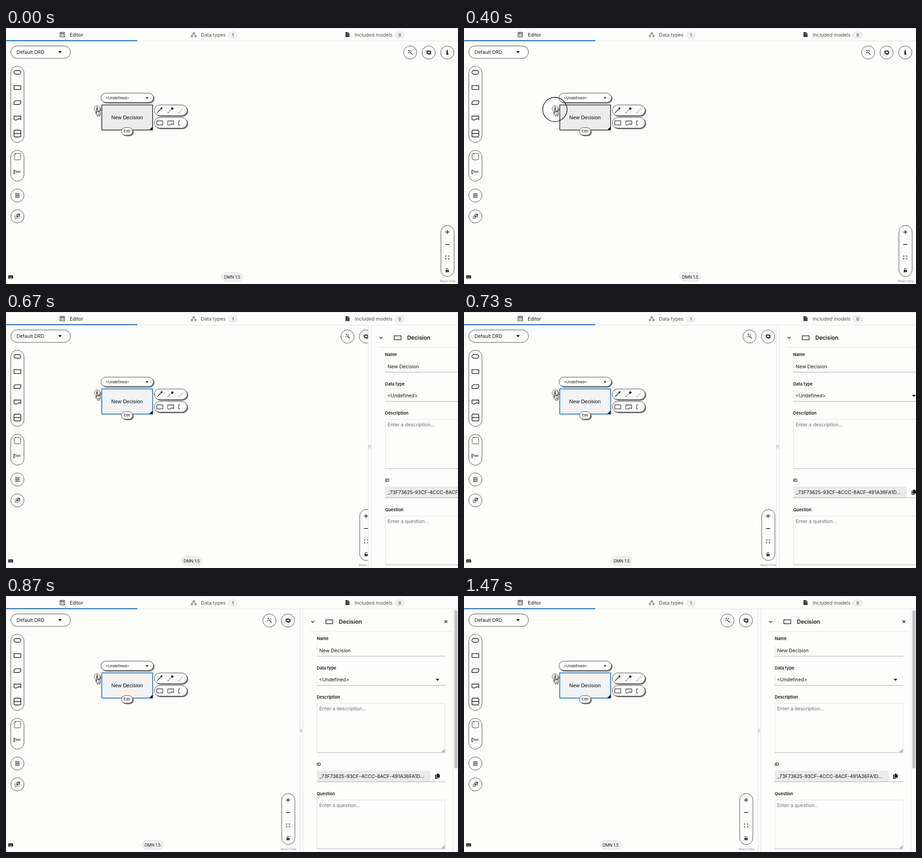
Recreate the animation shown at these times as an HTML page. Size 992 by 564 pixels, loop 1540 ms.

```html
<!DOCTYPE html>
<html lang="en">
<head>
<meta charset="utf-8">
<title>Decision editor</title>
<style>
  html, body { margin: 0; width: 100%; height: 100%; overflow: hidden; background: #fff; }
  svg { display: block; width: 100%; height: 100%; }
  text { font: 10.6px Inter, "Open Sans", sans-serif; fill: #151515; }
  .muted { fill: #4d4d4d; }
  .hint { fill: #6a6e73; }
  .small { font-size: 9px; }
  .label { font-size: 9.2px; font-weight: 600; }
  .mid { text-anchor: middle; }
  .pill { fill: #fdfdfc; stroke: #333; stroke-width: .9; }
  .badge { fill: #f0f0f0; stroke: #d5d5d9; stroke-width: .8; }
  .float { filter: drop-shadow(2px 2px .7px #777); }
  .icon { fill: none; stroke: #151515; stroke-width: 1.35; }
  .thin { stroke-width: 1; }
  .solid { fill: #151515; }
  .rule { fill: none; stroke: #e0e0ec; }
  .field { fill: none; stroke: #9a9ca6; stroke-width: .9; }
  #node rect { fill: #ececec; stroke: #111; stroke-width: 1.4; }
  #node.selected rect { fill: #f1f3f5; stroke: #1264ac; filter: drop-shadow(0 0 1.5px #8dbbe2); }
</style>
</head>
<body>
<svg viewBox="0 0 992 564">
  <defs>
    <pattern id="dots" width="14.4" height="14.4" patternUnits="userSpaceOnUse">
      <circle cx="12.5" cy="12.5" r=".5" fill="#dcdce6"/>
    </pattern>
    <path id="caret" class="solid" d="M-4-2H4L0 2.4Z"/>
    <path id="doc" d="M-7.5-4H7.5V3.5Q3.5 1 0 3.5T-7.5 3.5Z"/>
    <path id="grip" class="icon thin" d="M0 0l-6 6M0 3.5l-2.5 2.5"/>
    <g id="letter-i" class="solid"><path d="M-2.6-1.5H1.4V3H2.8V5H-2.8V3H-1.2V.5H-2.6Z"/><circle cy="-3.6" r="1.6"/></g>
  </defs>
  <rect width="992" height="564" fill="#fdfdfb"/>
  <rect y="29" width="992" height="535" fill="url(#dots)"/>

  <!-- tabs -->
  <rect width="992" height="28" fill="#fdfdfb"/>
  <path class="rule" d="M0 .5H992M0 28.5H992"/>
  <rect y="27" width="288" height="2" fill="#1264ac"/>
  <g class="icon" style="stroke-width:1">
    <path d="M118.5 9.5h10v10h-10zM120.5 11.5h2v2h-2zM124.5 11.5h2v2h-2zM120.5 16.5h2.5M124.500 16.5h2.500"/>
    <path style="stroke:#4d4d4d" d="M410.5 10h3v3h-3zM406.5 16.5h3v3h-3zM414.5 16.5h3v3h-3zM411 13l-3 3.5M413 13l3 3.5"/>
  </g>
  <path fill="#444" d="M745 9h5.5v3.5h3.5V20h-9zM751 9l3 3h-3z"/>
  <text x="140" y="19">Editor</text>
  <text class="muted" x="428" y="19">Data types</text>
  <text class="muted" x="765.5" y="19">Included models</text>
  <rect class="badge" x="488.5" y="8.5" width="19" height="14" rx="7"/>
  <rect class="badge" x="853.5" y="8.5" width="21" height="14" rx="7"/>
  <text class="small mid" x="498" y="19">1</text>
  <text class="small mid" x="864" y="19">0</text>

  <!-- left controls -->
  <rect class="pill" x="10.5" y="39.5" width="131" height="27.5" rx="13.75"/>
  <text x="23" y="57">Default DRD</text>
  <use href="#caret" x="118.5" y="53"/>
  <rect class="pill" x="10.5" y="84" width="29" height="168" rx="14.5"/>
  <rect class="pill" x="10.5" y="269.5" width="29" height="68" rx="14.5"/>
  <circle class="pill" cx="25" cy="369" r="14.5"/>
  <circle class="pill" cx="25" cy="415" r="14.5"/>
  <g class="icon">
    <rect x="17.5" y="93.7" width="15" height="8" rx="4"/>
    <rect x="17.5" y="127" width="15" height="8.5"/>
    <path d="M20.5 160.3H32.5V165.5L29.5 168.5H17.5V163.3Z" stroke-linejoin="round"/>
    <use href="#doc" x="25" y="198"/>
    <rect x="17.5" y="225" width="15" height="15" rx="3"/>
    <path d="M17.5 232.5h15M20 365.5h10M20 369h10M20 372.5h10"/>
    <rect x="18" y="276.5" width="14" height="14" rx="3" stroke-dasharray="2.6 1.8"/>
    <path d="M19 313h-1.5v8H19"/>
    <path class="thin" d="M24 410h6v6h-6zM25 415l4-4M26.5 411H29v2.5"/>
    <path class="thin" d="M20 414h6v6h-6z" stroke-dasharray="1.5 1"/>
    <path class="thin" d="M21 419l4-4"/>
  </g>
  <text x="19" y="319.3" style="font-size:6px;font-weight:600">Text</text>
  <rect class="solid" x="5" y="545" width="10.5" height="7" rx="1"/>
  <path d="M6.5 547h7.5M6.5 548.7h7.5" stroke="#fff" stroke-width=".8" stroke-dasharray="1 .8"/>
  <path d="M7.5 550.5h5.5" stroke="#fff" stroke-width=".8"/>

  <!-- decision node -->
  <g id="node">
    <rect x="210.3" y="169.5" width="111.4" height="55.2"/>
    <path class="solid" d="M322 217V225H314Z"/>
    <text class="mid" x="265.5" y="201" style="font:11.3px 'Liberation Sans',Arial,sans-serif;fill:#000">New Decision</text>
  </g>
  <g class="float">
    <rect class="pill" x="208.5" y="143.5" width="115" height="20.5" rx="10.25"/>
    <rect class="pill" x="325.5" y="169.5" width="72" height="23.5" rx="11.75"/>
    <rect class="pill" x="325.5" y="197" width="72" height="23.5" rx="11.75"/>
    <rect class="pill" x="253.5" y="219.5" width="24.5" height="16.5" rx="8.25"/>
    <circle class="pill" cx="200" cy="178" r="6.5"/>
  </g>
  <text x="219" y="157" style="font-size:8.2px">&lt;Undefined&gt;</text>
  <use href="#caret" transform="translate(309.5 154) scale(.8)"/>
  <text class="mid" x="265.5" y="230.3" style="font-size:8px">Edit</text>
  <use href="#letter-i" transform="translate(200 178) scale(.75)"/>
  <g class="icon" style="stroke-width:1.1">
    <path d="M331.5 187L341 177"/>
    <path d="M355 187l9-9" stroke-dasharray="3 2"/>
    <path d="M379 187l10-10" stroke-dasharray="1.7 3"/>
    <rect x="331" y="204.5" width="13" height="9"/>
    <use href="#doc" transform="translate(361.5 209) scale(.88 1.05)"/>
    <path d="M382 204.5h-3v9h3"/>
  </g>
  <path class="solid" d="M343.5 174.5l-1.5 5-3.5-3.5z"/>
  <circle class="solid" cx="365" cy="177.5" r="2.5"/>

  <!-- bottom and right controls -->
  <g id="version">
    <rect class="badge" x="473.5" y="538.5" width="46" height="19.5" rx="9.75"/>
    <text class="small mid" x="496.5" y="551.7">DMN 1.5</text>
  </g>
  <g id="right">
    <g id="tools">
      <circle class="pill" cx="887" cy="54" r="14.5"/>
      <circle class="pill" cx="927.5" cy="54" r="14.5"/>
      <path class="icon" stroke-linecap="round" d="M886 52.5l5.5 5.5"/>
      <path class="icon thin" d="M884.5 48v3M883 49.5h3M888.5 49v2M882.5 53.5h2M889 52l1.5-1.5M883 56l1.5-1.5"/>
      <rect class="icon thin" x="923" y="50" width="8" height="6" rx="1"/>
      <rect class="icon" x="924.8" y="51.5" width="7.5" height="5" fill="#fff"/>
      <path class="icon" d="M926.5 58.3h4.5"/>
    </g>
    <g id="info">
      <circle class="pill" cx="968.5" cy="54" r="14.5"/>
      <use href="#letter-i" x="968.5" y="53.5"/>
    </g>
    <rect class="pill" x="954.5" y="435" width="29" height="112.5" rx="14.5"/>
    <path class="icon" d="M964 449.5h9M968.5 445v9M964 477h9"/>
    <path class="icon" style="stroke-width:1.2" d="M964.8 504v-2h2M970.2 502h2v2M972.2 507v2h-2M966.8 509h-2v-2"/>
    <rect class="solid" x="965.2" y="533" width="6.6" height="5" rx=".7"/>
    <path class="icon" style="stroke-width:1.1" d="M966.5 533v-1.5a2 2 0 0 1 4 0"/>
    <circle cx="968.5" cy="535.5" r=".9" fill="#fff"/>
    <text class="mid" x="969.5" y="560" style="font-size:6.7px;fill:#8d8d95">React Flow</text>
  </g>

  <!-- properties drawer, placed at its open position -->
  <g id="drawer">
    <rect x="644.5" y="29" width="348" height="535" fill="#fdfdfb"/>
    <path class="rule" d="M645 29V564M651.5 29V564M668 78H977M981 29V564"/>
    <path d="M646.3 292.5v8M649 292.5v8" stroke="#a5a5ad" stroke-width="1"/>
    <path class="icon" d="M670 55l3.2 3.2L676.4 55"/>
    <rect class="icon" x="702" y="52.5" width="15" height="8.5"/>
    <text x="730.5" y="61" style="font-size:12.1px;font-weight:600">Decision</text>
    <path class="icon" d="M962.5 53.5l6 6M968.5 53.5l-6 6"/>
    <text class="label" x="682" y="97">Name</text>
    <text class="label" x="682" y="161.5">Data type</text>
    <text class="label" x="682" y="226">Description</text>
    <text class="label" x="682" y="374">ID</text>
    <text class="label" x="682" y="438.5">Question</text>
    <rect x="682" y="384.5" width="249" height="24.5" fill="#ebebeb"/>
    <text x="687.5" y="123.8">New Decision</text>
    <text x="687" y="188">&lt;Undefined&gt;</text>
    <text class="hint" x="687.5" y="252">Enter a description...</text>
    <text x="687.5" y="400.8">_73F73625-93CF-4CCC-8ACF-491A36FA1D...</text>
    <text class="hint" x="687.5" y="465">Enter a question...</text>
    <use href="#caret" x="947" y="184.5"/>
    <path class="rule" d="M682.5 108V132M682.5 172V197M682.5 345V236.5H963.5V345M682.5 557V449.5H963.5V557"/>
    <path class="field" d="M682 132.5H964M682 197H964M682 345H964M682 409.3H964M682 557H964"/>
    <use href="#grip" x="963" y="338"/>
    <use href="#grip" x="963" y="550"/>
    <path class="solid" d="M945 391.5h4l3 3v5.5h-7zM942 393.5h2v7.5h5v1.5h-7z"/>
    <rect x="984" y="31" width="7" height="349" rx="3.5" fill="#c1c1c1"/>
  </g>

  <circle id="ring" cx="199.5" cy="179.5" r="26.7" fill="none" stroke="#111" stroke-width="1.4"/>
  <path d="M199 188.5V180.5q0-1.5 1.2-1.5t1.3 1.5V185q1-.8 2 .2 1-.5 1.8.4 1.7-.2 1.7 1.6v2.3q0 1.5-1 2.7v1.8h-5.5v-1.5l-4-4.5q-.8-1.5.4-1.9 1-.2 2.1 1.4z"
    fill="#fff" stroke="#111" stroke-width="1" stroke-linejoin="round"/>
  <path d="M201.8 188.5v3M203.5 188.5v3M205.2 188.5v3" stroke="#111" stroke-width=".7"/>
</svg>
<script>
const LOOP = 1540, PRESS = 335, RELEASE = 505, OPEN = 598, SLIDE = 223, LAYOUT_LAG = 6.5;
const part = id => document.getElementById(id);
const shift = (id, x) => part(id).setAttribute('transform', `translate(${x} 0)`);
const show = (id, on) => part(id).style.display = on ? '' : 'none';

// CSS "ease": cubic-bezier(.25, .1, .25, 1)
function ease(x) {
  if (x <= 0) return 0;
  if (x >= 1) return 1;
  const curve = (a, b, u) => 3 * a * u * (1 - u) ** 2 + 3 * b * u * u * (1 - u) + u ** 3;
  let low = 0, high = 1;
  for (let i = 0; i < 24; i++) {
    const mid = (low + high) / 2;
    if (curve(.25, .25, mid) < x) low = mid; else high = mid;
  }
  return curve(.1, 1, low);
}

function draw() {
  const t = performance.now() % LOOP;
  const open = t >= OPEN;
  const canvasShift = -349.5 * ease((t - OPEN - LAYOUT_LAG) / SLIDE);
  show('ring', t >= PRESS && t < RELEASE);
  show('drawer', open);
  show('info', !open);
  part('node').classList.toggle('selected', open);
  shift('drawer', 345 * (1 - ease((t - OPEN) / SLIDE)));
  shift('tools', open ? 40.7 : 0);
  shift('right', canvasShift);
  shift('version', canvasShift / 2);
  requestAnimationFrame(draw);
}
draw();
</script>
</body>
</html>
```
